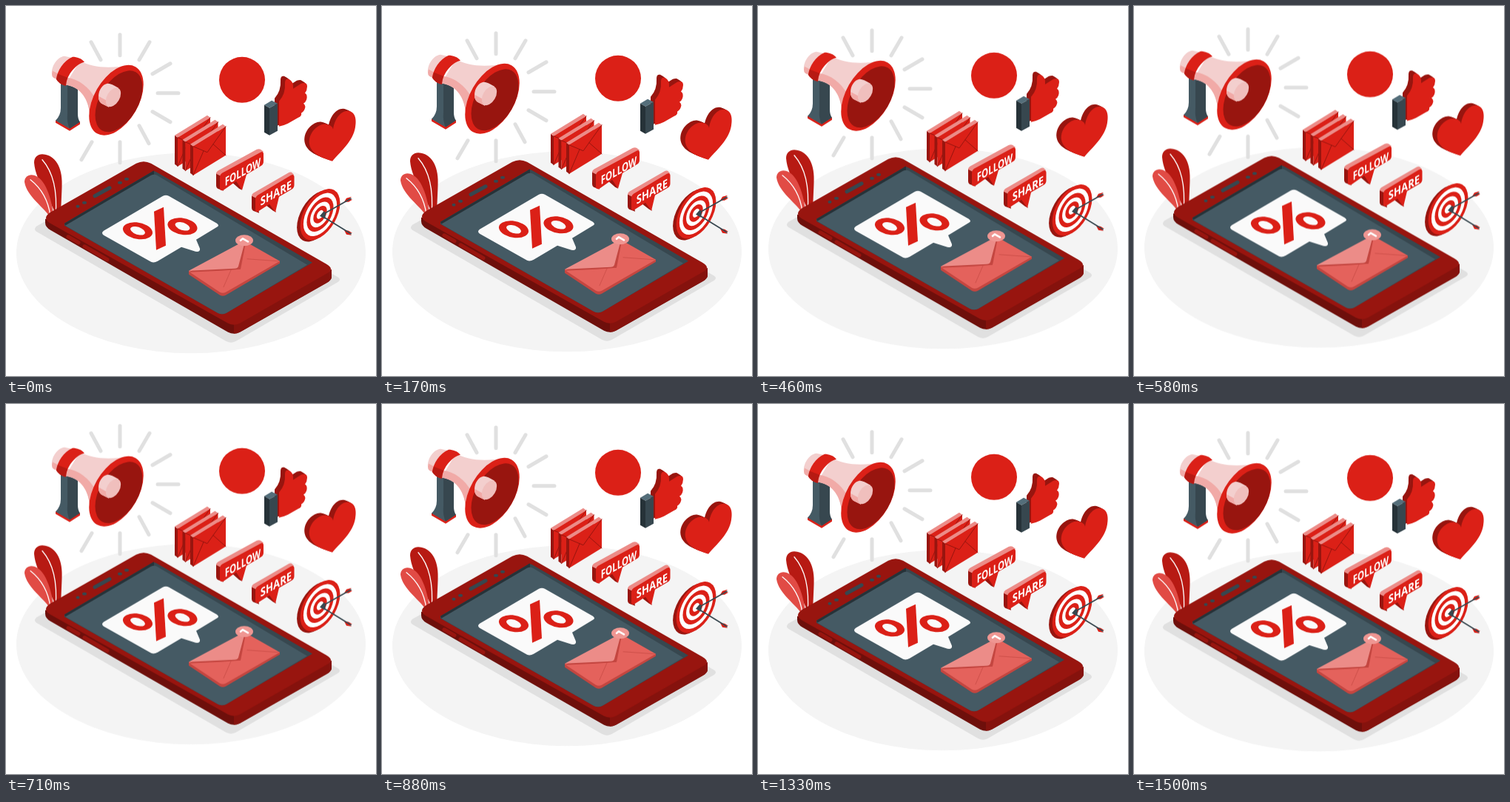
Write an HTML page that moves like this. It is 500x500 px and loops after 1540 ms.

```html
<!DOCTYPE html>
<html lang="en">
<head>
<meta charset="utf-8">
<title>Social marketing</title>
<style>
  html, body { margin: 0; width: 100%; height: 100%; overflow: hidden; background: #fff; }
  svg { display: block; width: 100vw; height: 100vh; }
  .float { animation: float 1540ms linear infinite; }
  @keyframes float {
    0% { transform: translateY(0); }
    46.43% { transform: translateY(-9.53px); }
    95.13% { transform: translateY(.47px); }
    100% { transform: translateY(-.53px); }
  }
  .red { fill: #db2017; }
  .dark { fill: #98150f; }
  .deep { fill: #6e0f0b; }
  .rose { fill: #ec8c88; }
  .pale { fill: #f3cfce; }
  .pink { fill: #f1aaa7; }
  .slate { fill: #455a64; }
  .navy { fill: #37474f; }
  .ink { fill: #263238; }
  .white { fill: #fff; }
  .line { fill: none; stroke-linecap: round; stroke-linejoin: round; }
  text { font: 700 16px "Open Sans", "Noto Sans", sans-serif; fill: #fff; text-anchor: middle; }
</style>
</head>
<body>
<svg viewBox="0 0 500 500">
  <defs>
    <path id="heart" d="M441 210C430 206 413 202 410 187C408 170 424 158 433 160C438 161 441 163 442 167C444 153 452 142 462 142C472 143 474 153 472 164C469 183 452 197 441 210Z"/>
    <path id="hand" d="M369 163V129Q378 119 377 104Q377 98 382 99Q389 102 388 112L399 105Q407 102 407 109Q407 114 404 118Q408 120 406 127Q405 130 402 132Q406 135 403 141Q401 144 399 145Q400 149 395 151L381 159Q375 162 369 163Z"/>
    <ellipse id="zero" rx="10.3" ry="13.900" fill="none" stroke="#db2017" stroke-width="8.200"/>
    <g id="letter">
      <path class="dark" d="M249 187L253 190V229L249 226Z"/>
      <path class="rose" d="M249 187L293 160L297 163L253 190Z"/>
      <path class="red" d="M253 190L297 163V202L253 229Z"/>
      <path class="line" stroke="#98150f" d="M253 190L272 198L297 163M253 229L267 196M297 202L280 187"/>
    </g>
  </defs>
  <g class="float">
    <ellipse cx="250" cy="334" rx="236" ry="135.5" fill="#f4f4f4"/>
    <path fill="#e0e0e0" d="M41 298Q37 302 41 305L297 453Q304 457 311 453L449 373Q453 370 449 367L190 215Z"/>

    <!-- leaves -->
    <path fill="#b71a13" d="M70 290C60 258 40 238 38 212C38 203 45 199 53 201C69 204 77 222 75.500 245C75 262 74 275 74 290Z"/>
    <path fill="#e14b45" d="M63 290C52 272 28 258 25 238C25 231 31 227 38 229C52 233 62 257 65 290Z"/>
    <path class="line" stroke="#fff" stroke-width="1.3" d="M49 208C63 224 70 247 67 284M33 235C47 246 57 262 60 284"/>

    <!-- phone -->
    <path class="deep" d="M53 288L440 358V367Q439 371 434 374L316 441Q308 445 300 441L60 303Q53 299 53 293Z"/>
    <path fill="#85120d" d="M308 428L440 356V367Q439 371 434 374L316 441Q312 443 308 443Z"/>
    <path class="dark" d="M60 279L176 213Q186 208 196 213L433 349Q445 356 433 362L316 429Q308 433 300 429L60 294Q48 287 60 279Z"/>
    <path class="line" stroke="#98150f" stroke-width="5" d="M84 312L98 320M106 325L137 343"/>
    <path class="line" stroke="#37474f" stroke-width="5" d="M120 257L140 246"/>
    <g class="navy">
      <ellipse cx="97" cy="271" rx="2.5" ry="2"/><ellipse cx="106" cy="266" rx="3" ry="2"/>
      <ellipse cx="154" cy="239" rx="3" ry="2"/><ellipse cx="163" cy="234" rx="3" ry="2"/>
    </g>
    <path class="navy" d="M79 294L196 225Q200 222 204 225L414 347L298 415Q292 418 286 415L79 297Z"/>
    <path class="ink" d="M79 294L196 225Q200 222 200 223V228L81 298Z"/>
    <path class="slate" d="M80 297L196 229Q200 227 204 229L407 350L298 415Q292 418 286 415Z"/>

    <!-- discount bubble -->
    <path fill="#fafafa" d="M132 304L212 257Q216 255 220 257L285 294Q289 297 285 299L257 316L262 328Q263 333 256 332L237 326L205 345Q200 348 196 346L132 310Q128 307 132 304Z"/>
    <use href="#zero" transform="matrix(.866 -.5 .866 .5 178 304)"/>
    <use href="#zero" transform="matrix(.866 -.5 .866 .5 238.500 298)"/>
    <path class="red" d="M200 278L213 272L216 324L203 330Z"/>

    <!-- open message -->
    <path fill="#c44640" d="M247 358L370 345V348L297 391Q293 393 289 391L247 363Z"/>
    <path fill="#e4625c" d="M247 359L319 320Q322 317 326 320L370 345L297 387Q293 389 289 387Z"/>
    <path class="line" stroke="#cf514b" d="M304 357L294 380M326 342L368 345"/>
    <path fill="#c44640" d="M247 360L319 320L324 320L317 356L290 358Z"/>
    <path class="rose" d="M247 358L318 320Q322 317 322 322L314 352Q313 355 309 355Z"/>
    <ellipse cx="322" cy="317" rx="12" ry="7.500" fill="#ef9692"/>
    <path class="line" stroke="#fff" stroke-width="2.600" d="M317 317L320 314.500L327 318.500"/>

    <!-- megaphone -->
    <path class="line" stroke="#e0e0e0" stroke-width="5" d="M154 39V67M115 49L128 73M194 49L180 73M222 78L198 92M205 118H233M198 143L222 157M180 162L193 186M154 184V212M116 184L102 208"/>
    <path class="red" d="M67 155L84 145L100 157V160L86 169L67 158Z"/>
    <path class="slate" d="M74 100L85 107V146Q84 158 86 166L67 155Q74 148 74 138Z"/>
    <path class="navy" d="M83 107L97 108V146Q97 153 100 157L86 166Q82 158 83 146Z"/>
    <path class="pale" d="M62 92C61 82 69 69 79 68L93 71L72 101L64 97Q62 95 62 92Z"/>
    <path class="pink" d="M62 92L63 88L71 92L70 100L64 97Q62 95 62 92Z"/>
    <path class="pale" d="M100 74C116 84 141 85 168 80L113 146C111 122 97 108 80 107Z"/>
    <path class="pink" d="M82 97C98 99 112 109 121 126L113 146C111 122 97 108 80 107Z"/>
    <path class="red" d="M68 99C69 88 78 74 90 69C96 69 102 71 106 76C96 78 82 92 81 108C75 107 70 103 68 99Z"/>
    <path fill="#b71a13" d="M68 99L70 92L83 97Q81 103 81 108C75 107 70 103 68 99Z"/>
    <ellipse class="red" rx="52" ry="30" transform="translate(149 127.500) rotate(-60)"/>
    <ellipse class="dark" rx="45.500" ry="26" transform="translate(152.500 129) rotate(-60)"/>
    <path class="pale" d="M125 123C125 113 131 106 137 105Q141 104 152 111L139 137L129 132Q125 129 125 123Z"/>
    <path class="pink" d="M125 122L136 128L139 137L129 132Q125 129 125 122Z"/>
    <ellipse fill="#f0bfbd" rx="14" ry="8.500" transform="translate(145 123.500) rotate(-60)"/>

    <!-- letters -->
    <use href="#letter" x="-21" y="-12"/>
    <use href="#letter" x="-10.500" y="-6"/>
    <use href="#letter"/>

    <circle class="red" cx="319" cy="100" r="31"/>

    <!-- thumb -->
    <g class="dark">
      <use href="#hand" x="-6" y="-4"/><use href="#hand" x="-4" y="-2.700"/><use href="#hand" x="-2" y="-1.300"/>
    </g>
    <use href="#hand" class="red"/>
    <path fill="#546e7a" d="M349 134L359 128L367 132L356 138Z"/>
    <path class="ink" d="M349 134L356 138V175L349 171Z"/>
    <path class="navy" d="M356 138L367 132V169L356 175Z"/>

    <!-- heart -->
    <g class="dark">
      <use href="#heart" x="-6.500" y="-3"/><use href="#heart" x="-4" y="-2"/><use href="#heart" x="-2" y="-1"/>
    </g>
    <use href="#heart" class="red"/>

    <!-- labels -->
    <path class="dark" d="M284 226L290 226L294 250L286 247Q284 246 284 243ZM306 239L312 233L319 249L315 247Z"/>
    <path class="rose" d="M284 227Q284 224 288 222L339 194Q342 193 344 194L348 197L290 230Z"/>
    <path class="red" d="M289 232Q289 228 292 226L344 198Q348 196 348 200V210Q348 214 345 216L325 228L319 249L311 237L294 249Q289 251 289 246Z"/>
    <text transform="matrix(.72 -.405 0 1 320 230)">FOLLOW</text>
    <path class="dark" d="M332 257L338 257L342 280L334 277Q332 276 332 273ZM352 270L358 264L365 279L361 277Z"/>
    <path class="rose" d="M332 257Q332 254 336 252L381 226Q384 224 386 225L389 228L338 260Z"/>
    <path class="red" d="M337 262Q337 258 340 256L385 229Q389.500 227 389.500 231V242Q389.500 246 386 248L369 258L364 279L356 268L342 277Q337 280 337 276Z"/>
    <text transform="matrix(.82 -.46 0 1 365 258.500)">SHARE</text>

    <!-- dartboard -->
    <g transform="translate(420 284) rotate(-60)"><ellipse class="dark" rx="38" ry="22"/></g>
    <g transform="translate(424.500 282) rotate(-60)">
      <ellipse class="red" rx="38" ry="22"/>
      <ellipse class="white" rx="32" ry="18.500"/>
      <ellipse class="red" rx="25.500" ry="14.700"/>
      <ellipse class="white" rx="19" ry="11"/>
      <ellipse class="red" rx="13" ry="7.500"/>
      <ellipse class="white" rx="6.500" ry="3.800"/>
    </g>
    <path class="red" d="M457 265L460 260L467 258L464 261L468 262L463 265ZM457 303L463 304L468 307L464 307L467 310L460 309Z"/>
    <path class="line" stroke="#37474f" stroke-width="1.700" d="M427 282.500L466 260.500M427 284L466 308"/>
    <path class="navy" d="M424 284L430 277L432 282L431 288Z"/>
  </g>
</svg>
</body>
</html>
```
